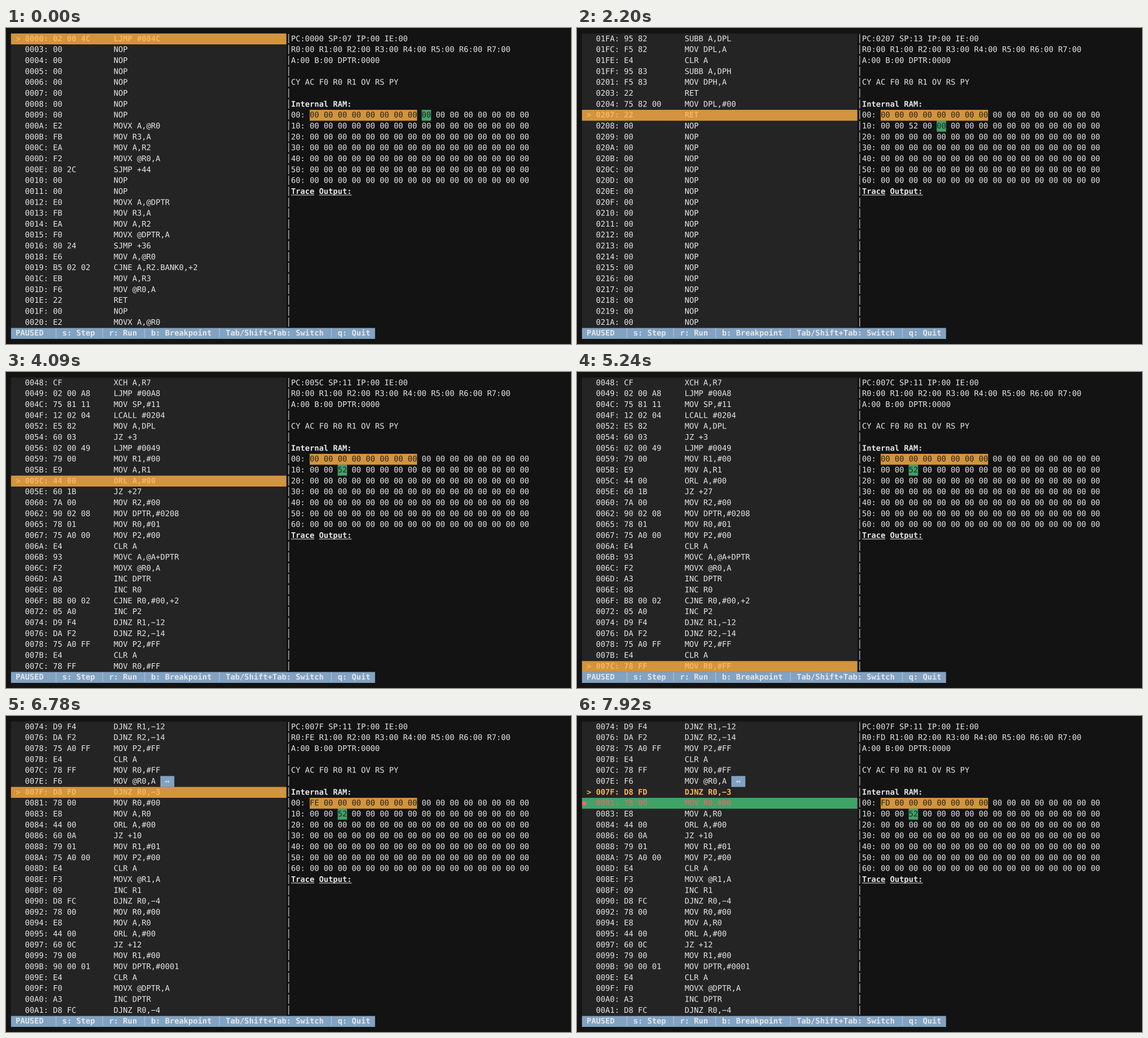
An HTML page with a canvas for the animation above (8000 ms loop, 1001 by 560 pixels).

```html
<!DOCTYPE html>
<html lang="en">
<head>
<meta charset="utf-8">
<title>8051 debugger</title>
<style>
  html, body { margin: 0; width: 100%; height: 100%; overflow: hidden; background: #131313; }
  canvas { display: block; width: 1001px; height: 560px; }
</style>
</head>
<body>
<canvas id="screen" width="2002" height="1120"></canvas>
<script>
const ctx = document.getElementById('screen').getContext('2d');
const LEFT = 8.8, TOP = 9.7, CELL = 8.27, LINE = 19.33, BASELINE = 13.6;
const ROWS = 27, PANEL = 59, INFO = 60, LOOP = 8000;
const BG = '#131313', BLACK = '#242424', FG = '#e6e6e6', ORANGE = '#d2943e',
  AMBER = '#f8b55f', GREEN = '#40a368', RED = '#f2646c', BLUE = '#82a2c2';

// Program memory; anything not listed is a NOP.
const memory = new Map();

function load(address, listing) {
  for (const line of listing.split(';')) {
    const [, bytes, text] = line.trim().match(/^((?:[0-9A-F]{2} )+)(.*)$/);
    const code = bytes.trim().split(' ');
    memory.set(address, { code, text });
    address += code.length;
  }
}

load(0x0A, `E2 MOVX A,@R0; FB MOV R3,A; EA MOV A,R2; F2 MOVX @R0,A; 80 2C SJMP +44;
  00 NOP; 00 NOP; E0 MOVX A,@DPTR; FB MOV R3,A; EA MOV A,R2; F0 MOVX @DPTR,A;
  80 24 SJMP +36; E6 MOV A,@R0; B5 02 02 CJNE A,R2.BANK0,+2; EB MOV A,R3;
  F6 MOV @R0,A; 22 RET; 00 NOP; E2 MOVX A,@R0`);
load(0x42, `A8 82 MOV R0,DPL; 20 F5 D9 JB B.5,−39; 80 CF SJMP −49; 02 00 A8 LJMP #00A8;
  75 81 11 MOV SP,#11; 12 02 04 LCALL #0204; E5 82 MOV A,DPL; 60 03 JZ +3;
  02 00 49 LJMP #0049; 79 00 MOV R1,#00; E9 MOV A,R1; 44 00 ORL A,#00; 60 1B JZ +27;
  7A 00 MOV R2,#00; 90 02 08 MOV DPTR,#0208; 78 01 MOV R0,#01; 75 A0 00 MOV P2,#00;
  E4 CLR A; 93 MOVC A,@A+DPTR; F2 MOVX @R0,A; A3 INC DPTR; 08 INC R0;
  B8 00 02 CJNE R0,#00,+2; 05 A0 INC P2; D9 F4 DJNZ R1,−12; DA F2 DJNZ R2,−14;
  75 A0 FF MOV P2,#FF; E4 CLR A; 78 FF MOV R0,#FF; F6 MOV @R0,A; D8 FD DJNZ R0,−3;
  78 00 MOV R0,#00; E8 MOV A,R0; 44 00 ORL A,#00; 60 0A JZ +10; 79 01 MOV R1,#01;
  75 A0 00 MOV P2,#00; E4 CLR A; F3 MOVX @R1,A; 09 INC R1; D8 FC DJNZ R0,−4;
  78 00 MOV R0,#00; E8 MOV A,R0; 44 00 ORL A,#00; 60 0C JZ +12; 79 00 MOV R1,#00;
  90 00 01 MOV DPTR,#0001; E4 CLR A; F0 MOVX @DPTR,A; A3 INC DPTR; D8 FC DJNZ R0,−4`);
load(0x48, 'CF XCH A,R7');
load(0x1FA, `95 82 SUBB A,DPL; F5 82 MOV DPL,A; E4 CLR A; 95 83 SUBB A,DPH;
  F5 83 MOV DPH,A; 22 RET; 75 82 00 MOV DPL,#00; 22 RET`);
load(0, '02 00 4C LJMP #004C');

// Each step changes part of the state at a time in ms.
const steps = [
  [0, { pc: 0, top: 0, sp: 0x07, r0: 0, stack: 0 }],
  [1230, { pc: 0x4C, top: 0x42 }],
  [1550, { pc: 0x4F, sp: 0x11 }],
  [1870, { pc: 0x204, top: 0x1FA, sp: 0x13, stack: 0x52 }],
  [2200, { pc: 0x207 }],
  [2530, { pc: 0x52, top: 0x48, sp: 0x11 }],
  [2870, { pc: 0x54 }],
  [3200, { pc: 0x59 }],
  [3700, { pc: 0x5B }],
  [4090, { pc: 0x5C }],
  [4440, { pc: 0x5E }],
  [4730, { pc: 0x7B }],
  [5240, { pc: 0x7C }],
  [5560, { pc: 0x7E, top: 0x74, r0: 0xFF }],
  [5950, { pc: 0x7F }],
  [6490, { pc: 0x7E, r0: 0xFE }],
  [6780, { pc: 0x7F }],
  [7030, { pc: 0x7E, r0: 0xFD }],
  [7300, { pc: 0x7F }],
  [7560, { cursor: 0x81 }],
  [7920, { breakpoint: 0x81 }]
];

const hex = (n, digits = 2) => n.toString(16).toUpperCase().padStart(digits, '0');
const instructionAt = address => memory.get(address) || { code: ['00'], text: 'NOP' };

function fill(col, row, cols, rows, color) {
  ctx.fillStyle = color;
  ctx.fillRect(LEFT + col * CELL, TOP + row * LINE, cols * CELL, rows * LINE);
}

function write(col, row, text, color = FG, bold = false) {
  ctx.font = `${bold ? 'bold ' : ''}13.74px "DejaVu Sans Mono", monospace`;
  ctx.fillStyle = color;
  [...text].forEach((char, i) => {
    if (char !== ' ') ctx.fillText(char, LEFT + (col + i) * CELL, TOP + row * LINE + BASELINE);
  });
}

function underlined(col, row, text) {
  write(col, row, text, FG, true);
  ctx.fillRect(LEFT + col * CELL, TOP + row * LINE + BASELINE + 1.6, text.length * CELL, 1);
}

function branchTarget(pc) {
  const { code, text } = instructionAt(pc);
  if (!/^(JZ|DJNZ)/.test(text)) return -1;
  const offset = parseInt(code.at(-1), 16) << 24 >> 24;
  return pc + code.length + offset;
}

function drawListing({ pc, top, cursor = pc, breakpoint }) {
  const target = branchTarget(pc);
  fill(0, 0, PANEL, ROWS, BLACK);
  for (let row = 0, address = top; row < ROWS; row++) {
    const { code, text } = instructionAt(address);
    const current = address === pc, stop = address === breakpoint;
    const color = current ? AMBER : stop ? RED : FG;
    if (address === cursor) fill(0, row, PANEL, 1, current ? ORANGE : GREEN);
    if (stop) write(0, row, '●', color);
    if (current) write(1, row, '>', color, true);
    write(3, row, `${hex(address, 4)}: ${code.join(' ')}`, color, current);
    write(22, row, text, color, current);
    if (address === target) {
      fill(23 + text.length, row, 3, 1, BLUE);
      write(24 + text.length, row, '↔');
    }
    write(PANEL, row, '│');
    address += code.length;
  }
}

function drawInfo({ pc, sp, r0, stack }) {
  const registers = [r0, 0, 0, 0, 0, 0, 0, 0];
  write(INFO, 0, `PC:${hex(pc, 4)} SP:${hex(sp)} IP:00 IE:00`);
  write(INFO, 1, registers.map((value, i) => `R${i}:${hex(value)}`).join(' '));
  write(INFO, 2, 'A:00 B:00 DPTR:0000');
  write(INFO, 4, 'CY AC F0 R0 R1 OV RS PY');
  write(INFO, 6, 'Internal RAM:', FG, true);
  fill(INFO + 4, 7, 23, 1, ORANGE);
  for (let address = 0; address < 0x70; address++) {
    const row = 7 + (address >> 4), col = INFO + 4 + (address & 15) * 3;
    const value = address === 0 ? r0 : address === 0x12 ? stack : 0;
    const next = address === sp + 1;
    if (address % 16 === 0) write(INFO, row, hex(address) + ':');
    if (next) fill(col, row, 2, 1, GREEN);
    write(col, row, hex(value), next || address < 8 ? BLACK : FG);
  }
  underlined(INFO, 14, 'Trace');
  underlined(INFO + 6, 14, 'Output:');
}

function drawStatus() {
  const keys = ' PAUSED    s: Step   r: Run   b: Breakpoint   Tab/Shift+Tab: Switch   q: Quit';
  fill(0, ROWS, 78, 1, BLUE);
  write(0, ROWS, keys, FG, true);
  for (const col of [9, 19, 28, 44, 68]) write(col + 0.15, ROWS, '│', '#b4c5d6');
}

function draw() {
  const time = performance.now() % LOOP;
  const state = Object.assign({}, ...steps.filter(([start]) => start <= time).map(step => step[1]));
  ctx.setTransform(2, 0, 0, 2, 0, 0);
  ctx.textRendering = 'geometricPrecision';
  ctx.fillStyle = BG;
  ctx.fillRect(0, 0, 1001, 560);
  drawListing(state);
  drawInfo(state);
  drawStatus();
  requestAnimationFrame(draw);
}
draw();
</script>
</body>
</html>
```
